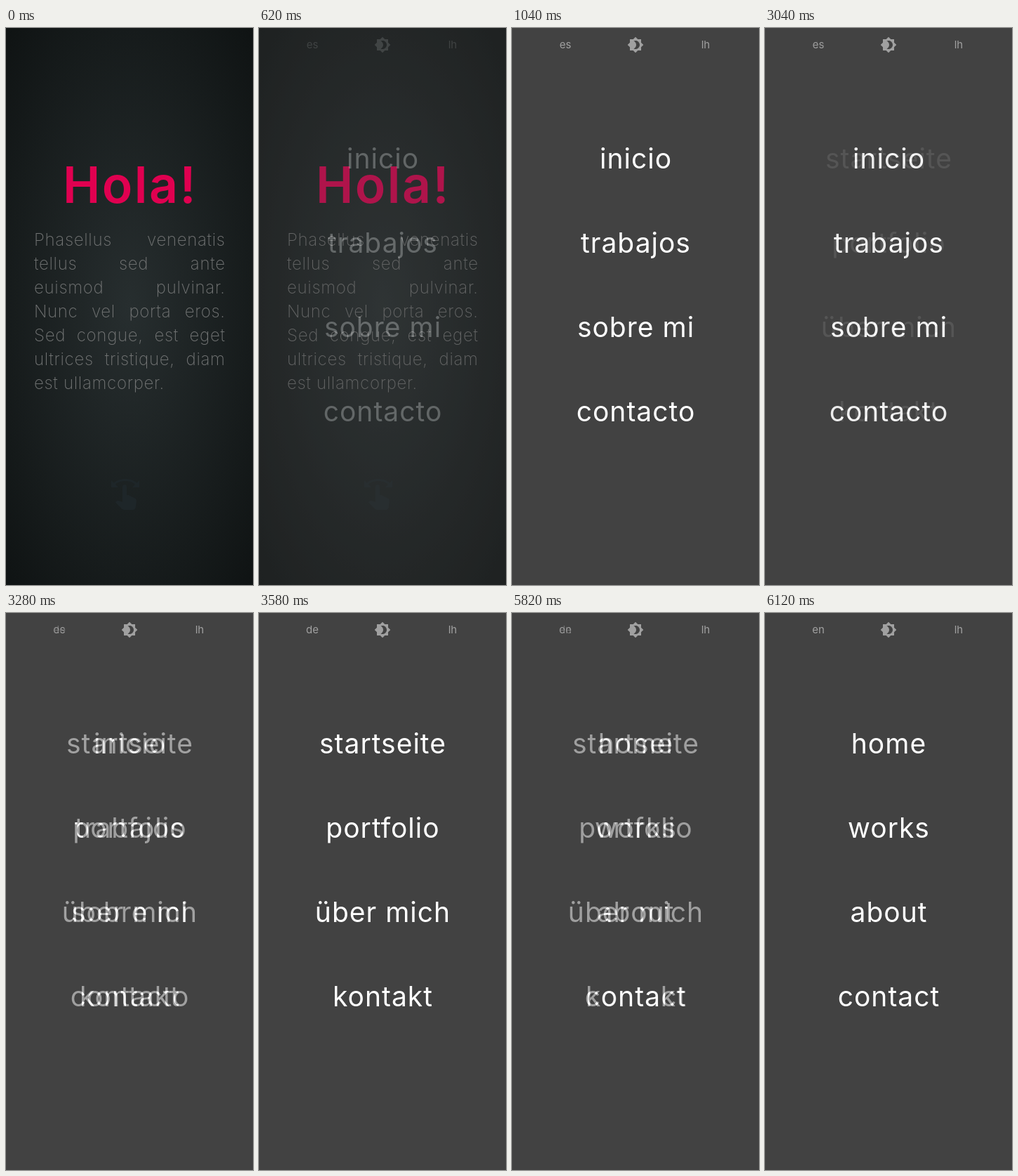
Write an HTML page that moves like this. It is 352 px wide and 793 px high and loops after 8 s.

```html
<!DOCTYPE html>
<html lang="es">
<head>
<meta charset="utf-8">
<title>Menu</title>
<style>
  html, body { margin: 0; width: 100%; height: 100%; overflow: hidden; background: #0f1313; }
  #stage {
    position: relative; width: 352px; height: 793px; overflow: hidden;
    background: radial-gradient(#272e2f, #0f1313);
    font-family: Inter, Roboto, sans-serif; font-optical-sizing: none;
  }
  svg { position: absolute; left: 0; top: 0; width: 352px; height: 793px; }
  .title { font-size: 71.5px; font-weight: 600; letter-spacing: 2.5px; fill: #e00050; }
  .intro {
    position: absolute; left: 40px; top: 285px; width: 272.7px;
    font-size: 24px; font-weight: 200; line-height: 34px; letter-spacing: .7px; color: #727474;
  }
  .intro div { white-space: nowrap; text-align: justify; text-align-last: justify; }
  .intro div:last-child { text-align-last: left; }
  .swipe { fill: #1e2629; }
  .panel { opacity: 0; }
  .panel text { text-anchor: middle; fill: #fff; font-size: 39px; letter-spacing: 1px; }
  .panel .small { font-size: 15px; letter-spacing: 0; fill: #a0a0a0; }
  .panel path { fill: #a0a0a0; }
</style>
</head>
<body>
<div id="stage">
  <svg viewBox="0 0 352 793">
    <text class="title" x="81" y="249">Hola!</text>
    <g class="swipe" transform="translate(146 640) scale(2)">
      <path d="M18.89 14.75l-4.09-2.04c-.28-.14-.58-.21-.89-.21H13v-6C13 5.67 12.33 5 11.5 5S10 5.67 10 6.5v10.74L6.75 16.5c-.33-.07-.68.03-.92.28L5 17.62l4.54 4.79c.38.38 1.14.59 1.67.59h6.16c1 0 1.84-.73 1.98-1.72l.63-4.46c.12-.85-.32-1.69-1.09-2.07z"/>
      <path d="M20.13 3.87C18.69 2.17 15.6 1 12 1S5.31 2.17 3.87 3.87L2 2v5h5L4.93 4.93c1-1.29 3.7-2.43 7.07-2.43s6.07 1.14 7.07 2.43L17 7h5V2z"/>
    </g>
  </svg>
  <div class="intro">
    <div>Phasellus venenatis</div>
    <div>tellus sed ante</div>
    <div>euismod pulvinar.</div>
    <div>Nunc vel porta eros.</div>
    <div>Sed congue, est eget</div>
    <div>ultrices tristique, diam</div>
    <div>est ullamcorper.</div>
  </div>
</div>
<script>
  const LOOP = 8000, STEP = 60, STEPS = 10;
  const menus = [
    { start: 500, lang: 'es', items: ['inicio', 'trabajos', 'sobre mi', 'contacto'] },
    { start: 3040, lang: 'de', items: ['startseite', 'portfolio', 'über mich', 'kontakt'] },
    { start: 5580, lang: 'en', items: ['home', 'works', 'about', 'contact'] }
  ];
  const sun = 'M20 8.69V4h-4.69L12 .69 8.69 4H4v4.69L.69 12 4 15.31V20h4.69L12 23.31 15.31 20H20v-4.69L23.31 12z' +
    'M12 18c-.89 0-1.74-.2-2.5-.55C11.56 16.5 13 14.42 13 12s-1.44-4.5-3.5-5.45C10.26 6.2 11.11 6 12 6c3.31 0 6 2.69 6 6s-2.69 6-6 6z';

  const label = (text, x) => `<text class="small" x="${x}" y="29">${text}</text>`;

  // Each language is an opaque panel that fades in over the one below.
  const stage = document.getElementById('stage');
  stage.insertAdjacentHTML('beforeend', menus.map(({ lang, items }) => `
    <svg class="panel" viewBox="0 0 352 793">
      <rect width="352" height="793" fill="#424242"/>
      ${label(lang, 76)}${label('lh', 276)}
      <path transform="translate(164 12)" fill-rule="evenodd" d="${sun}"/>
      ${items.map((item, i) => `<text x="176.5" y="${200 + 120 * i}">${item}</text>`).join('')}
    </svg>`).join(''));
  const panels = [...stage.querySelectorAll('.panel')];

  const fade = (t, start) =>
    Math.min(STEPS, Math.max(0, Math.floor((t - start) / STEP) + 1)) / STEPS;

  const origin = performance.now();
  function draw() {
    const t = (performance.now() - origin) % LOOP;
    panels.forEach((panel, i) => { panel.style.opacity = fade(t, menus[i].start); });
    requestAnimationFrame(draw);
  }
  draw();
</script>
</body>
</html>
```
